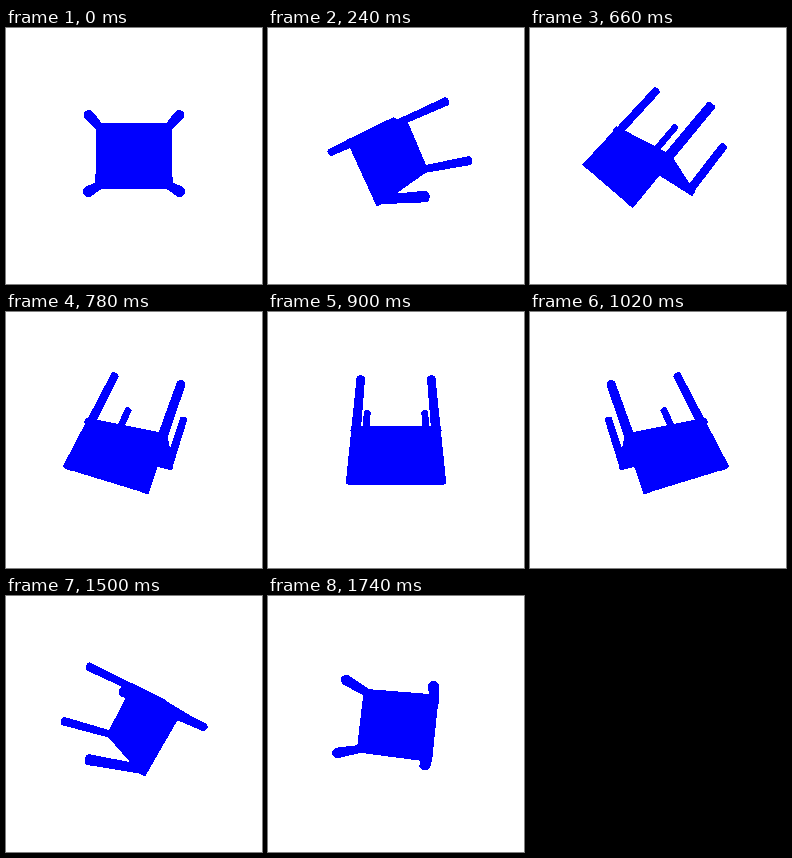
Write an HTML page with a canvas that moves like this. It is 256 px wide and 256 px high and loops after 1.8 s.

```html
<!DOCTYPE html>
<html lang="en">
<head>
<meta charset="utf-8">
<title>Turning chair</title>
<style>
html, body { margin: 0; width: 100%; height: 100%; overflow: hidden; background: #fff; }
canvas { display: block; width: 256px; height: 256px; }
</style>
</head>
<body>
<canvas id="stage" width="256" height="256"></canvas>
<script>
const SIZE = 256, MID = 128;
const STEP = 60, STEPS = 30;
const EYE = 234;                 // camera distance
const AXIS = Math.PI / 3;        // spin axis, leaning from the line of sight
const TILT = 0.04;               // lean of the chair at rest
const W = 35, D = 29.5, R = 4, H = 54;

const ctx = document.getElementById('stage').getContext('2d', { willReadFrequently: true });

function box(x0, x1, y0, y1, z0, z1) {
  const pts = [];
  for (const x of [x0, x1]) for (const y of [y0, y1]) for (const z of [z0, z1]) pts.push([x, y, z]);
  return pts;
}

function rod(x, y, z0, z1) {
  const pts = [];
  for (let i = 0; i < 8; i++) {
    const a = (i + 0.5) * Math.PI / 4;
    for (const z of [z0, z1]) pts.push([x + R * 1.06 * Math.cos(a), y + R * 1.06 * Math.sin(a), z]);
  }
  return pts;
}

const parts = [
  rod(-W, D, -H, H),
  rod(W, D, -H, H),
  rod(-W, -D, -8, H),
  rod(W, -D, -8, H),
  box(-W - R, W + R, -D - R, D + R, -9, -4),
  box(-W, W, D - 3, D + 3, -H, -4)
];

// Rotation about the leaning axis, then perspective
function projector(angle) {
  const c = Math.cos(angle), s = Math.sin(angle), k = 1 - c;
  const ay = Math.sin(AXIS), az = Math.cos(AXIS);
  const ct = Math.cos(TILT), st = Math.sin(TILT);
  return ([x, v, w]) => {
    const y = v * ct + w * st, z = w * ct - v * st;
    const dot = (ay * y + az * z) * k;
    const px = x * c + (ay * z - az * y) * s;
    const py = y * c + az * x * s + ay * dot;
    const pz = z * c - ay * x * s + az * dot;
    const f = EYE / (EYE - pz);
    return [MID + px * f, MID - py * f];
  };
}

function hull(pts) {
  pts.sort((a, b) => a[0] - b[0] || a[1] - b[1]);
  const half = list => {
    const out = [];
    for (const p of list) {
      while (out.length > 1) {
        const [a, b] = out.slice(-2);
        if ((b[0] - a[0]) * (p[1] - a[1]) - (b[1] - a[1]) * (p[0] - a[0]) > 0) break;
        out.pop();
      }
      out.push(p);
    }
    out.pop();
    return out;
  };
  return half(pts).concat(half(pts.slice().reverse()));
}

// Hard pixel edges
function crisp() {
  const img = ctx.getImageData(0, 0, SIZE, SIZE), d = img.data;
  for (let i = 0; i < d.length; i += 4) {
    d[i] = d[i + 1] = d[i] < 128 ? 0 : 255;
    d[i + 2] = 255;
  }
  ctx.putImageData(img, 0, 0);
}

function draw(step) {
  const project = projector(step * 2 * Math.PI / STEPS);
  ctx.fillStyle = '#fff';
  ctx.fillRect(0, 0, SIZE, SIZE);
  ctx.fillStyle = '#00f';
  for (const part of parts) {
    ctx.beginPath();
    for (const [x, y] of hull(part.map(project))) ctx.lineTo(x, y);
    ctx.closePath();
    ctx.fill();
  }
  crisp();
}

let shown = -1;
function tick() {
  const step = Math.floor(performance.now() / STEP) % STEPS;
  if (step !== shown) draw(shown = step);
  requestAnimationFrame(tick);
}
draw(0);
tick();
</script>
</body>
</html>
```
